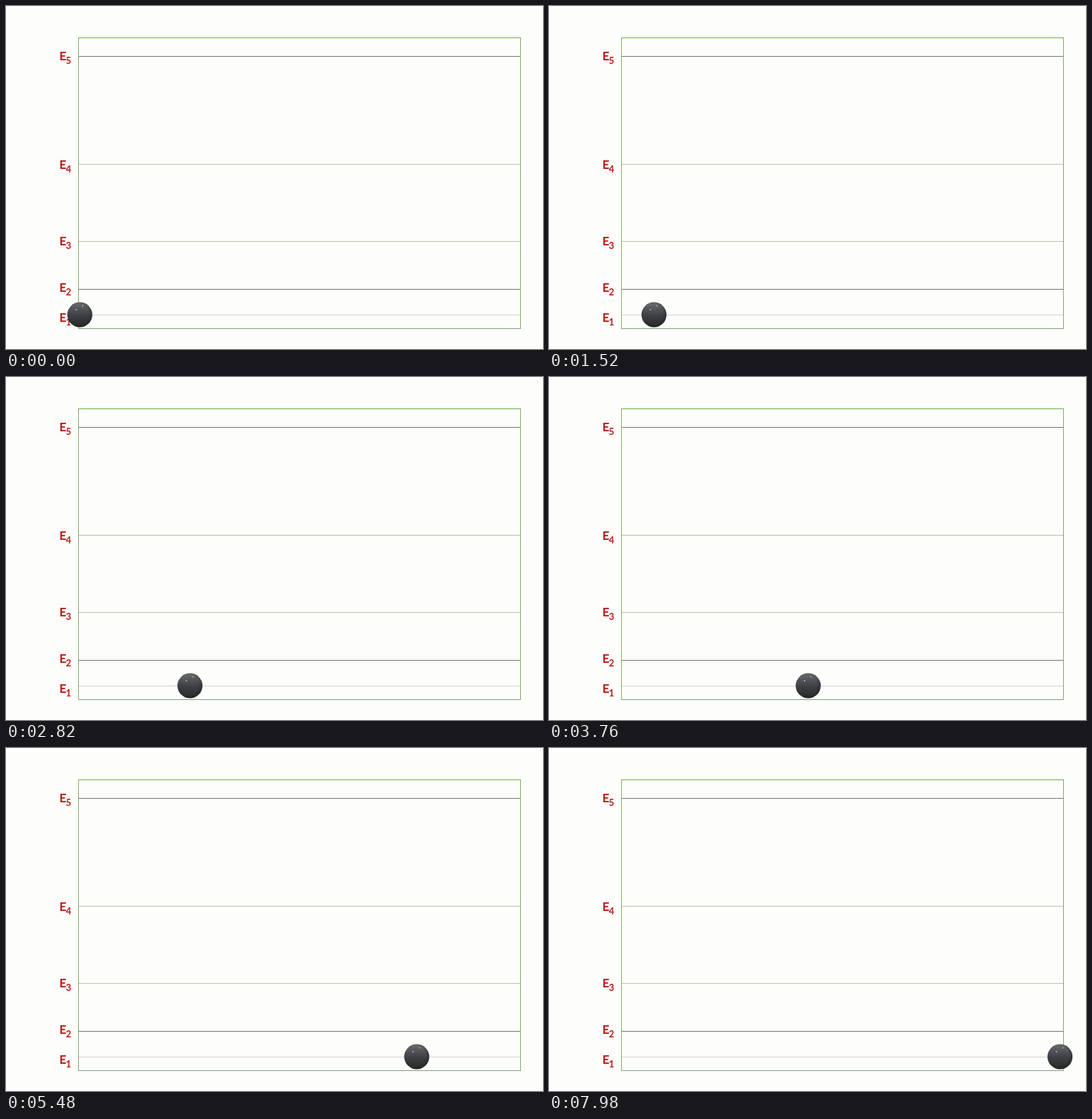
An HTML page that plays this animation: 752x480 px, repeating every 8000 ms.

```html
<!DOCTYPE html>
<html lang="en">
<head>
<meta charset="utf-8">
<title>Ball at the lowest energy level</title>
<style>
  html, body { margin: 0; width: 100%; height: 100%; overflow: hidden; background: #fdfdfb; }
  svg { display: block; }
  text { font: 700 17px Lato, Carlito, sans-serif; fill: #b81a18; }
  .sub { font-size: 13px; }
</style>
</head>
<body>
<svg width="752" height="480" viewBox="0 0 752 480">
  <defs>
    <linearGradient id="body" x2="0" y2="1">
      <stop offset="0" stop-color="#6c6c68"/>
      <stop offset=".3" stop-color="#505258"/>
      <stop offset=".55" stop-color="#3c3e42"/>
      <stop offset="1" stop-color="#2a2a28"/>
    </linearGradient>
    <radialGradient id="rim" cx=".45" cy=".45" r=".55">
      <stop offset=".7" stop-color="#1c1c1c" stop-opacity="0"/>
      <stop offset="1" stop-color="#1c1c1c" stop-opacity=".4"/>
    </radialGradient>
  </defs>
  <g id="levels"></g>
  <rect x="101.5" y="44.5" width="619" height="407" fill="none" stroke="#86a866"/>
  <path d="M101 44.5H721" stroke="#6fb04a"/>
  <path d="M101 451.5H721" stroke="#8a9c84"/>
  <g id="ball">
    <circle r="17.5" fill="url(#body)"/>
    <circle r="17.5" fill="url(#rim)"/>
    <circle cx="-5" cy="-7" r="1" fill="#b4b8d0"/>
    <circle cx="4" cy="-12.5" r="1" fill="#a8a898"/>
  </g>
</svg>
<script>
  const DARK = '#74796f', LIGHT = '#bcc3a8', PALE = '#d4d6d4';
  // number, line y, label baseline, line colour
  const levels = [
    [5, 70.5, 76, DARK], [4, 221.5, 228, LIGHT], [3, 329.5, 335, LIGHT],
    [2, 396.5, 400, DARK], [1, 432.5, 442, PALE]
  ];
  document.getElementById('levels').innerHTML = levels.map(([n, y, base, color]) => `
    <path d="M102 ${y}H720" stroke="${color}"/>
    <text x="74.7" y="${base}">E</text>
    <text class="sub" x="83.8" y="${base + 5}">${n}</text>`).join('');

  const ball = document.getElementById('ball');
  const LOOP = 8000, START_X = 103.3, TRAVEL = 614, STEPS = 178.5, RAMP = 0.4;

  // Steps are held for 100, 20 and 20 ms in turn, beginning 20 ms into the loop.
  function stepAt(ms) {
    const round = Math.floor((ms - 20) / 140);
    const rest = ms - 20 - round * 140;
    return round * 3 + 1 + (rest >= 100) + (rest >= 120);
  }

  // Constant acceleration, constant speed, constant deceleration.
  function ease(u) {
    if (u > 0.5) return 1 - ease(1 - u);
    const speed = 1 / (1 - RAMP);
    return u < RAMP ? speed * u * u / (2 * RAMP) : speed * (u - RAMP / 2);
  }

  function draw(now) {
    const x = START_X + TRAVEL * ease((stepAt(now % LOOP) + 1) / STEPS);
    ball.setAttribute('transform', `translate(${x.toFixed(2)} 432)`);
    requestAnimationFrame(draw);
  }
  draw(0);
</script>
</body>
</html>
```
